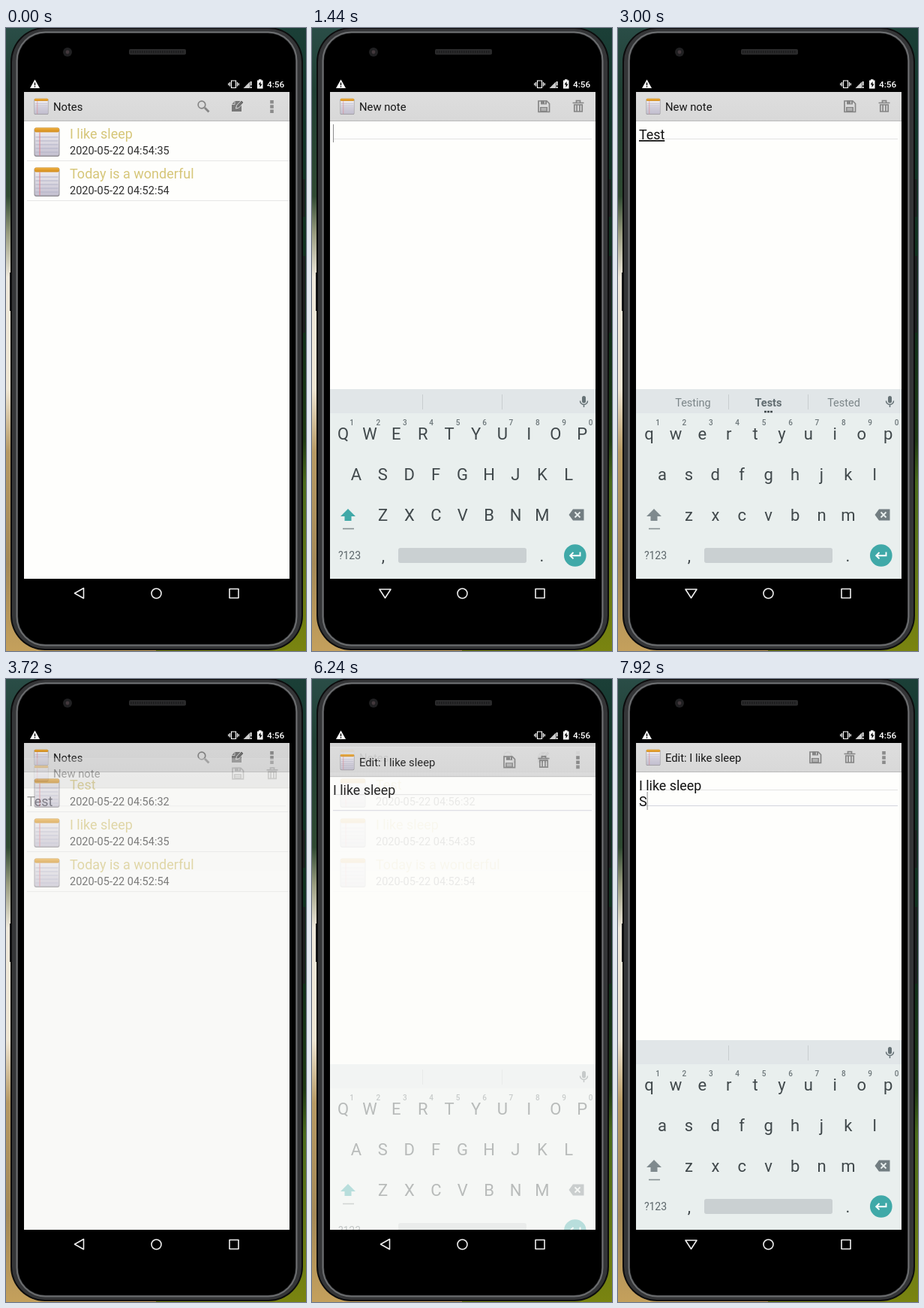
Recreate the animation shown at these times as an HTML page. Size 400 by 828 pixels, loop 8 s.

```html
<!DOCTYPE html>
<html lang="en">
<head>
<meta charset="utf-8">
<title>Notes</title>
<style>
html, body { margin: 0; width: 100%; height: 100%; overflow: hidden; background: #000; }
svg { display: block; width: 400px; height: 828px; }
text { font-family: Roboto, "Noto Sans", sans-serif; white-space: pre; }
.bar { font-size: 14.8px; fill: #161616; }
.title { font-size: 18px; fill: #d6c679; }
.date { font-size: 14.5px; fill: #2e2e2e; }
.body { font-size: 17.85px; fill: #111; }
.key { font-size: 22px; fill: #40484b; text-anchor: middle; }
.hint { font-size: 10px; font-weight: 500; fill: #6c7679; text-anchor: middle; }
.word { font-size: 14.5px; fill: #7b8588; text-anchor: middle; }
.nav { fill: none; stroke: #eee; stroke-width: 1.6; stroke-linejoin: round; }
</style>
</head>
<body>
<svg viewBox="0 0 400 828" xmlns="http://www.w3.org/2000/svg">
<defs>
  <linearGradient id="leftBg" x2="0" y2="1">
    <stop offset="0" stop-color="#2a4d47"/><stop offset=".1" stop-color="#203f33"/>
    <stop offset=".27" stop-color="#2f4a32"/><stop offset=".33" stop-color="#9a9d80"/>
    <stop offset=".4" stop-color="#efe9dc"/><stop offset=".58" stop-color="#efe6d4"/>
    <stop offset=".68" stop-color="#b79a64"/><stop offset=".86" stop-color="#a58a58"/>
    <stop offset="1" stop-color="#c4a05c"/>
  </linearGradient>
  <linearGradient id="rightBg" x2="0" y2="1">
    <stop offset="0" stop-color="#1b3f37"/><stop offset=".15" stop-color="#12352a"/>
    <stop offset=".5" stop-color="#12301a"/><stop offset=".66" stop-color="#1f3a14"/>
    <stop offset=".73" stop-color="#4a6a1c"/><stop offset="1" stop-color="#7a8410"/>
  </linearGradient>
  <linearGradient id="barBg" x2="0" y2="1">
    <stop offset="0" stop-color="#dedede"/><stop offset="1" stop-color="#d8d8d8"/>
  </linearGradient>
  <linearGradient id="paper" x2="0" y2="1">
    <stop offset="0" stop-color="#f2f0f2"/><stop offset="1" stop-color="#c4c0d0"/>
  </linearGradient>
  <linearGradient id="binding" x2="0" y2="1">
    <stop offset="0" stop-color="#f0b040"/><stop offset="1" stop-color="#d18c1c"/>
  </linearGradient>
  <clipPath id="screen"><rect x="24" y="85" width="354" height="647"/></clipPath>

  <symbol id="pad" viewBox="0 0 36 40">
    <rect x="1" y="1" width="34" height="38.5" rx="3" fill="#949197"/>
    <rect x="2" y="2" width="32" height="36" rx="2" fill="url(#paper)"/>
    <path d="M3 13.5h30M3 18.5h30M3 23.5h30M3 28.5h30M3 33.5h30" stroke="#b3b3c8"/>
    <path d="M8.5 7v31" stroke="#e0808a"/>
    <rect x="1.5" y="1" width="33" height="6" rx="2" fill="url(#binding)"/>
  </symbol>
  <g id="find" fill="none" stroke="#858585">
    <circle cx="-2" cy="-2" r="4.8" stroke-width="1.7"/>
    <path d="M2 2l5.500 5.500" stroke-width="2.8"/>
  </g>
  <g id="compose">
    <path d="M-7-2.500l4-4.500h9v14h-13z" fill="#777"/>
    <path d="M-7-2.500h4v-4.500" fill="none" stroke="#ccc"/>
    <path d="M-1.500 3l1-4 6.500-7 3 3-6.500 7z" fill="#707070" stroke="#dcdcdc"/>
  </g>
  <path id="more" d="M-2.300-8.500h4.600v4.600h-4.600zM-2.300-2.300h4.600v4.600h-4.600zM-2.300 3.900h4.600v4.600h-4.600z" fill="#8b8b8b"/>
  <g id="save">
    <path d="M-7-7h11l3.500 3.500v11h-14.500z" fill="none" stroke="#858585" stroke-width="1.7"/>
    <path d="M-4-7.500h8v5h-8zM-5 1h10v6h-10z" fill="#858585"/>
    <path d="M1.500-6.500v3M-3.500 3h7M-3.500 5h7" stroke="#ddd"/>
  </g>
  <g id="trash" fill="none" stroke="#858585" stroke-width="1.7">
    <path d="M-7.500-4.500h15M-2.500-5v-2.300h5v2.300"/>
    <path d="M-5.200-2v9h10.400v-9z"/>
    <path d="M-1.900-2v9M1.900-2v9"/>
  </g>
</defs>

<rect width="200" height="828" fill="url(#leftBg)"/>
<rect x="200" width="200" height="828" fill="url(#rightBg)"/>

<g id="phone">
  <path d="M394 201h4.500v50h-4.500zM394 303h5v102h-5zM5 325h4v51h-4z" fill="#1e1f21"/>
  <rect x="6" y="-1" width="390" height="828" rx="46" fill="#0c0c0d"/>
  <rect x="8" y="1" width="386" height="824" rx="44" fill="#343537"/>
  <rect x="14.500" y="5.500" width="373" height="815" rx="38" fill="none" stroke="#6c6e70" stroke-width="2"/>
  <rect x="16" y="7" width="370" height="812" rx="37" fill="#000"/>
  <circle cx="82" cy="32" r="6" fill="#202022"/>
  <circle cx="82" cy="32" r="2.4" fill="#43393d"/>
  <rect x="164" y="28" width="76" height="7.5" rx="2" fill="#2a2a2b"/>
  <path d="M166 31.700h72" stroke="#1b1b1c" stroke-width="3" stroke-dasharray="1.5 1.5"/>
</g>

<g id="status" fill="#fff">
  <path d="M38.500 68.500l6.500 11.500h-13z"/>
  <path d="M38.500 72.500v3.800M38.500 77.300v1.500" stroke="#000" stroke-width="1.4"/>
  <path d="M300.500 70h6v9.500h-6zM298.500 72v5.500M308.500 72v5.500M296.700 73.300v3M310.300 73.300v3" fill="none" stroke="#fff" stroke-width="1.2"/>
  <path d="M316.500 80l9-9v9z" opacity=".8"/>
  <path d="M326.800 71v5.500M326.800 78v2" stroke="#fff" stroke-width="1.5"/>
  <path d="M335 69.500h2v-1.300h3.500v1.300h2v11h-7.500z"/>
  <path d="M339.500 71l-3 4.300h2v3.700l3-4.500h-2z" fill="#000"/>
  <text x="348" y="79" font-size="11.8" font-weight="500">4:56</text>
</g>

<g clip-path="url(#screen)">
  <rect x="24" y="84" width="354" height="648" fill="#fefefc"/>
  <g id="list"></g>
  <rect id="dim" x="24" y="84" width="354" height="648" fill="#000" opacity="0"/>
  <g id="note">
    <rect x="24" y="84" width="354" height="648" fill="#fefefc"/>
    <rect x="24" y="84" width="354" height="39.500" fill="url(#barBg)"/>
    <path d="M24 123.500h354" stroke="#b9b9b9"/>
    <use href="#pad" x="37" y="92.500" width="20" height="23.500"/>
    <text id="heading" class="bar" x="63" y="110"></text>
    <g id="newTools">
      <use href="#save" x="309" y="104"/><use href="#trash" x="355" y="104"/>
    </g>
    <g id="editTools">
      <use href="#save" x="263" y="104"/><use href="#trash" x="309" y="104"/><use href="#more" x="354.500" y="104.500"/>
    </g>
    <path d="M28 147.500h345" stroke="#e2e2e2"/>
    <path id="rule2" d="M28 168.500h345" stroke="#d3d5de"/>
    <text id="line1" class="body" x="28" y="148"><tspan id="marked" text-decoration="underline"></tspan><tspan id="plain"></tspan></text>
    <text id="line2" class="body" x="28" y="169"></text>
    <path id="caret" d="M0 0v24" stroke="#8d8d8d"/>
  </g>
  <g id="board">
    <rect x="24" y="480" width="354" height="252" fill="#e9efee"/>
    <rect x="24" y="480" width="354" height="32" fill="#e1e6e8"/>
    <path d="M147.500 487v20M253.500 487v20" stroke="#c8cdd0"/>
    <g id="words"></g>
    <g fill="#667276">
      <rect x="360" y="489" width="5" height="9.500" rx="2.500"/>
      <path d="M357.500 495.500a5 5 0 0 0 10 0M362.500 500.500v3.500" fill="none" stroke="#667276" stroke-width="1.5"/>
    </g>
    <g id="hints"></g>
    <g id="upper"></g>
    <g id="lower"></g>
    <path id="shift" d="M48 639l10 10h-5.500v6h-9v-6h-5.500z"/>
    <path d="M41 665.500h15" stroke="#858f92" stroke-width="1.6"/>
    <path d="M342.500 647l5.500-7.500h14.500v15h-14.500z" fill="#727d81"/>
    <path d="M350.500 643.500l7 7m0-7l-7 7" stroke="#e9efee" stroke-width="1.8"/>
    <text x="50" y="706" text-anchor="middle" font-size="14" fill="#5c666a">?123</text>
    <text class="key" x="95" y="709">,</text>
    <rect x="115" y="691" width="171" height="20" rx="3" fill="#cad0d2"/>
    <text class="key" x="306.500" y="709">.</text>
    <circle cx="350.800" cy="701" r="14.800" fill="#40a9a8"/>
    <path d="M357.500 696.500v4.700h-13M348.500 697l-4.300 4.200 4.300 4.200" fill="none" stroke="#fff" stroke-width="1.9"/>
  </g>
</g>

<g class="nav">
  <path id="back" d="M103.500 744.500v13.500l-12-6.750z"/>
  <path id="down" d="M90 746h15l-7.500 11.500z"/>
  <circle cx="200.500" cy="751.500" r="6.500"/>
  <rect x="298" y="745.500" width="12" height="12"/>
</g>
</svg>

<script>
const LOOP = 8000, STEP = 120;
const $ = id => document.getElementById(id);
const show = (id, on) => { $(id).style.display = on ? '' : 'none'; };
const within = (t, a, b) => t >= a && t < b;
const ramp = (t, start, span) => Math.min(1, Math.max(0, (t - start) / span));
const label = (cls, x, y, s) => `<text class="${cls}" x="${x}" y="${y}">${s}</text>`;

const older = [['I like sleep', '04:54:35'], ['Today is a wonderful', '04:52:54']];
const all = [['Test', '04:56:32'], ...older];

function listMarkup(notes) {
  const rows = notes.map(([title, time], i) => {
    const y = 124 + 53 * i;
    return `<use href="#pad" x="36.5" y="${y + 7.5}" width="36" height="40"/>` +
      label('title', 85, y + 23, title) + label('date', 85, y + 44, '2020-05-22 ' + time) +
      `<path d="M28 ${y + 52.5}h350" stroke="#e6e6e6"/>`;
  });
  return `<rect x="24" y="84" width="354" height="39.5" fill="url(#barBg)"/>
    <path d="M24 123.5h354" stroke="#b9b9b9"/>
    <use href="#pad" x="37" y="92.5" width="20" height="23.5"/>
    <use href="#find" x="263" y="104"/><use href="#compose" x="308" y="104"/>
    <use href="#more" x="354.5" y="104.5"/>` + label('bar', 63, 110, 'Notes') + rows.join('');
}

const keyRows = [['qwertyuiop', 41.5, 547], ['asdfghjkl', 59, 601], ['zxcvbnm', 94.5, 655]];
const PITCH = 35.4;
const keys = change => keyRows.map(([letters, x, y]) =>
  [...letters].map((c, i) => label('key', x + PITCH * i, y, change(c))).join('')).join('');
$('upper').innerHTML = keys(c => c.toUpperCase());
$('lower').innerHTML = keys(c => c);
$('hints').innerHTML = [...'1234567890'].map((c, i) => label('hint', 53 + PITCH * i, 528, c)).join('');

function wordMarkup(words) {
  if (!words) return '';
  const [a, b, c] = words;
  return label('word', 100, 503, a) + label('word', 301, 503, c) +
    `<text class="word" x="200.5" y="503" font-weight="700" style="fill:#606b6f">${b}</text>` +
    '<path d="M195 508.7h3v2.6h-3zM199 508.7h3v2.6h-3zM203 508.7h3v2.6h-3z" fill="#444c4f"/>';
}

// Opening and closing of the note window: vertical shift, opacity and dimming behind it
function noteWindow(t) {
  if (within(t, 3500, 3850)) {
    const p = ramp(t, 3500, 350);
    return { shift: 54 * p * p, alpha: 1 - p, dim: .1 * (1 - p) };
  }
  const start = t < 5000 ? 540 : 6060;
  if (t < start || within(t, 3850, 5000)) return { shift: 0, alpha: 0, dim: 0 };
  const p = ramp(t, start, 350);
  return { shift: 54 * (1 - p) ** 3, alpha: Math.min(1, p * 1.75), dim: .1 * p };
}

function keyboardLevel(t) {
  const up = t < 5000 ? ramp(t, 840, 300) : ramp(t, 6180, 300);
  const hide = t < 5000 ? ramp(t, 3360, 240) : 0;
  return (1 - (1 - up) ** 2) * (1 - hide * hide);
}

const typing = [1920, 2160, 2400, 2520];
const caretOn = [[1200, 1680], [1920, 3000], [7080, 7560], [7800, 8000]];

function draw(t) {
  const edit = t >= 5000;
  $('list').innerHTML = listMarkup(t < 3480 ? older : all);

  const { shift, alpha, dim } = noteWindow(t);
  $('note').setAttribute('transform', `translate(0 ${shift})`);
  $('note').setAttribute('opacity', alpha);
  $('dim').setAttribute('opacity', dim);
  $('heading').textContent = edit ? 'Edit: I like sleep' : 'New note';
  show('newTools', !edit);
  show('editTools', edit);
  show('rule2', edit);

  const text = edit ? 'I like sleep' : 'Test'.slice(0, typing.filter(k => t >= k).length);
  const markedLength = edit ? (within(t, 6480, 7080) ? 1 : 0) : (t < 3480 ? text.length : 0);
  $('marked').textContent = text.slice(0, markedLength);
  $('plain').textContent = text.slice(markedLength);
  $('line2').textContent = t >= 7800 ? 'S' : '';

  const line = $(edit ? 'line2' : 'line1');
  const width = line.textContent ? line.getComputedTextLength() : 0;
  show('caret', caretOn.some(([a, b]) => within(t, a, b)));
  $('caret').setAttribute('transform', `translate(${28.5 + width} ${edit ? 150 : 128})`);

  const level = keyboardLevel(t);
  $('board').setAttribute('opacity', level);
  $('board').setAttribute('transform', `translate(0 ${50 * (1 - level)})`);
  const caps = edit ? t < 7800 : t < 1920;
  show('upper', caps);
  show('lower', !caps);
  $('shift').setAttribute('fill', caps ? '#40a9a8' : '#7f8a8e');
  $('words').innerHTML = wordMarkup(
    within(t, 2640, 3600) ? ['Testing', 'Tests', 'Tested'] :
    within(t, 6480, 7080) ? ['In', 'I', 'Is'] : null);

  show('back', level < .5);
  show('down', level >= .5);
}

const begin = performance.now();
let last = -1;
function tick() {
  const t = Math.floor((performance.now() - begin) % LOOP / STEP) * STEP;
  if (t !== last) draw(last = t);
  requestAnimationFrame(tick);
}
tick();
</script>
</body>
</html>
```
